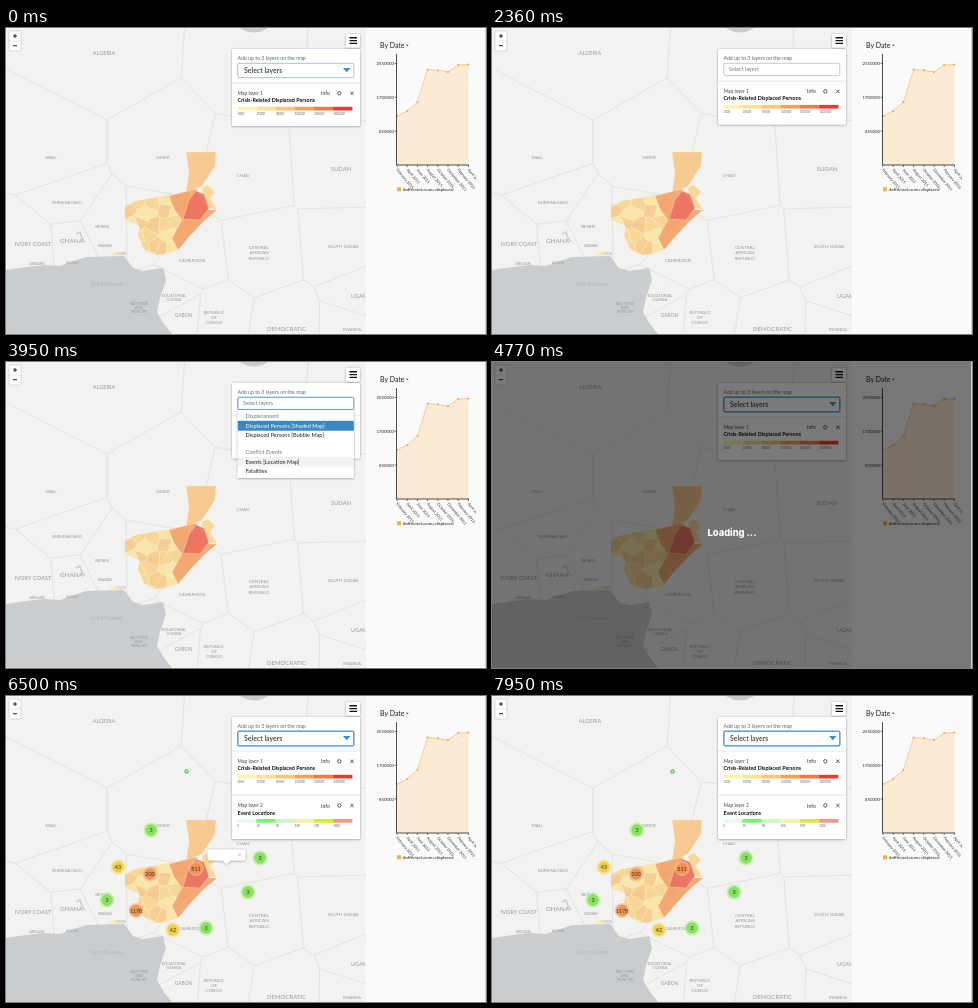
An HTML page that plays this animation: 480 px wide and 306 px high, repeating every 8 s.

```html
<!DOCTYPE html>
<html lang="en">
<head>
<meta charset="utf-8">
<title>Displacement map</title>
<style>
  html, body { margin: 0; width: 100%; height: 100%; overflow: hidden; background: #fafafb; }
  svg { display: block; width: 100vw; height: 100vh; font-family: Lato, "Open Sans", sans-serif; }
  .place { fill: #98999b; text-anchor: middle; }
  .borders { fill: none; stroke: #e2e2e4; stroke-width: .7; }
  .states { stroke: #fdf0cf; stroke-width: .35; fill-opacity: .88; }
</style>
</head>
<body>
<svg id="stage" viewBox="0 0 480 306" preserveAspectRatio="none"></svg>
<script>
const LOOP = 8000, OPEN = 2050, MENU = 2500, PICK = 4060, READY = 5140;

// Visible spans [from, to] in ms; a third value is a fade length.
const timeline = {
  closed: [[0, OPEN], [PICK, LOOP]],
  input: [[OPEN, PICK]],
  menu: [[MENU, PICK]],
  focus: [[MENU, PICK]],
  hover: [[3300, PICK]],
  ring: [[PICK, LOOP]],
  loading: [[PICK, READY]],
  panel1: [[0, OPEN], [PICK, READY]],
  panel2: [[READY, LOOP]],
  clusters: [[READY, LOOP]],
  popup: [[6330, 7400, 160]]
};

const text = (x, y, size, str, attrs = '') =>
  `<text x="${x}" y="${y}" font-size="${size}" ${attrs}>${str}</text>`;
const rect = (x, y, w, h, fill, attrs = '') =>
  `<rect x="${x}" y="${y}" width="${w}" height="${h}" fill="${fill}" ${attrs}/>`;
const path = (d, attrs = '') => `<path d="${d}" ${attrs}/>`;
const poly = (points, fill) => `<polygon points="${points}" fill="${fill}"/>`;
const group = (id, body) => `<g id="${id}">${body}</g>`;

let seed = 11;
const random = () => (seed = seed * 16807 % 2147483647) / 2147483647;

// Part of a polygon that lies nearer to point a than to point b.
function clipNearer(points, a, b) {
  const [dx, dy] = [b[0] - a[0], b[1] - a[1]];
  const side = p => (p[0] - (a[0] + b[0]) / 2) * dx + (p[1] - (a[1] + b[1]) / 2) * dy;
  return points.flatMap((p, i) => {
    const q = points[(i + 1) % points.length], sp = side(p), sq = side(q);
    const kept = sp <= 0 ? [p] : [];
    if (sp * sq < 0) kept.push(p.map((v, k) => v + (q[k] - v) * sp / (sp - sq)));
    return kept;
  });
}

function voronoi(sites) {
  const box = [[-1, -1], [361, -1], [361, 307], [-1, 307]];
  return sites.map(a => sites.filter(b => b !== a)
    .reduce((cell, b) => clipNearer(cell, a, b), box)
    .map(p => p.map(v => v.toFixed(1))).join(' '));
}

// Label, centre and type size; "|" breaks a line. Borders follow from the centres.
const countries = [
  ['ALGERIA', 98, 25, 5.5], ['', 255, 35], ['', 345, 40],
  ['MALI', 45, 129, 4.6], ['NIGER', 157, 129, 4.6], ['CHAD', 237, 147.5, 4.6],
  ['SUDAN', 335, 141, 5.9], ['BURKINA FASO', 61, 175, 4.2], ['BENIN', 96, 198.5, 4.5],
  ['GHANA', 65.5, 213.3, 6.4], ['IVORY COAST', 27, 216.5, 5.7], ['NIGERIA', 145, 198, 6],
  ['CAMEROON', 186, 233, 4.5], ['CENTRAL|AFRICAN|REPUBLIC', 253, 225, 4.5],
  ['SOUTH SUDAN', 337, 218.5, 4.3], ['EQUATORIAL|GUINEA', 168, 269.5, 4],
  ['GABON', 177.5, 287, 4.9], ['REPUBLIC|OF|CONGO', 208, 289.5, 4.5],
  ['DEMOCRATIC', 280.5, 301, 6], ['UGANDA', 357, 268, 5.5], ['RWANDA', 346, 302, 4]
];
const towns = [['IBADAN', 99, 218], ['ABIDJAN', 31, 236], ['ACCRA', 66, 234.5], ['LAGOS', 114, 226]];

function label([name, x, y, size]) {
  const lines = name.split('|');
  return lines.map((line, i) =>
    text(x, y + size * (.33 + 1.12 * (i - (lines.length - 1) / 2)), size, line, 'class="place"')).join('');
}

function drawStates() {
  const fills = ['#fbe3a0', '#fbe3a0', '#f9d38c', '#f8c987'];
  const sites = [];
  for (let x = 120; x < 195; x += 11)
    for (let y = 170; y < 230; y += 11) sites.push([x + random() * 9, y + random() * 9]);
  const cells = voronoi(sites).map(c => poly(c, fills[Math.floor(random() * fills.length)])).join('');
  return `<g class="states"><g clip-path="url(#stateClip)">${cells}</g>` +
    poly('180,124 210,124 209,138 196,158 180,165 183,145', '#f8c584') +
    poly('196,160 202,157 209,164 204,170 211,182 198,178', '#f9d38c') +
    poly('163,168 190,161 203,182 211,182 197,194 183,209 172,222 166,210 176,192 168,181', '#f3a16c') +
    poly('183,172 190,163 198,166 203,180 194,192 177,191', '#ec6e60') + '</g>';
}

function drawMap() {
  const cells = voronoi(countries.map(([, x, y]) => [x, y]));
  const water = 'M0,242L20,239 38,237 54,238 80,229 118,228 127,240 137,243 157,240' +
    'L160,252 154,270 151,284 158,296 166,306H0Z';
  return rect(0, 0, 360, 306, '#f2f2f1') + '<g clip-path="url(#mapClip)">' +
    `<g class="borders">${cells.map(c => poly(c, 'none')).join('')}</g>` +
    path(water + 'M234,0q14,9 28,0z', 'fill="#c9cdd0"') +
    path('M70,206l4,-2 2,6 3,4', 'fill="none" stroke="#c9cdd0" stroke-width="1.5"') +
    countries.filter(c => c[0]).map(label).join('') +
    towns.map(t => label([...t, 3.6])).join('') +
    text(100, 257.5, 5, 'Gulf of Guinea', 'text-anchor="middle" fill="#aeb3b7"') +
    label(['SÃO TOMÉ|AND|PRÍNCIPE', 133, 280, 3.7]) +
    poly('103,226 109,224 113,226 108,228', '#f8eba4') + drawStates() + '</g>';
}

function drawClusters() {
  const tone = n => n < 10 ? ['#b9ee98', '#7fe058'] : n < 100 ? ['#f5e08c', '#f1cb3c'] : ['#f6b88f', '#ee9049'];
  const marks = [
    [145, 134, 3], [112, 171, 43], [144, 178, 200], [190, 172.5, 811], [254, 162, 3],
    [242, 196, 3], [101, 204, 3], [130, 214.5, 1178], [167, 234, 42], [200, 232, 3]
  ];
  const disc = (x, y, r, fill, opacity) =>
    `<circle cx="${x}" cy="${y}" r="${r}" fill="${fill}" opacity="${opacity}"/>`;
  return marks.map(([x, y, n]) =>
    disc(x, y, 7.5, tone(n)[0], .75) + disc(x, y, 5.7, tone(n)[1], .9) +
    text(x, y + 2, 5.4, n, 'text-anchor="middle" fill="#333"')).join('') +
    '<circle cx="180.5" cy="75.5" r="1.7" fill="#c9f0c0" stroke="#38a838"/>';
}

const panelBox = bottom =>
  rect(226, 21, 128, bottom - 21, '#fff', 'rx="1.5" filter="url(#shadow)"');

// One legend section, hung below its divider.
function drawLayer(top, index, title, colors, stops) {
  const y = top + 10.3, step = 115 / 6;
  return path(`M226,${top}h128`, 'stroke="#e0e0e0" stroke-width=".8"') +
    text(231.5, y + 1.8, 4.9, `Map layer ${index}`, 'fill="#444"') +
    text(231.5, y + 9, 5.35, title, 'font-weight="700" fill="#111"') +
    text(315, y + 2, 5.1, 'Info', 'fill="#333"') +
    `<circle cx="333.3" cy="${y}" r="1.7" fill="none" stroke="#555"/>` +
    path(`M344.2,${y - 1.7}l3.4,3.4m0,-3.4l-3.4,3.4`, 'stroke="#444" stroke-width=".9"') +
    colors.map((c, i) => rect(231.3 + i * step, y + 13.5, step + .1, 3.7, c)).join('') +
    stops.map((s, i) => text(231.3 + i * step, y + 21.2, 3, s, 'fill="#666"')).join('');
}

const displaced = top => drawLayer(top, 1, 'Crisis-Related Displaced Persons',
  ['#fdf3ae', '#fbe19a', '#f9c67a', '#f5a257', '#ee7b4b', '#e63c34'],
  [1000, 10000, 50000, 100000, 500000, 1000000]);
const events = top => drawLayer(top, 2, 'Event Locations',
  ['#e3fbf4', '#72f572', '#cdf6cb', '#f4f3a6', '#d9ea35', '#f59888'],
  [0, 10, 50, 100, 500, 1000]);

function drawControls() {
  const field = (h, fill, stroke, width) =>
    rect(231.8, 35.3, 116, h, fill, `rx="1.2" stroke="${stroke}" stroke-width="${width}"`);
  const zoom = rect(3, 3, 12, 20, '#fff', 'rx="1.5" stroke="#c4c4c4" stroke-width=".6"') +
    path('M3,13h12', 'stroke="#ccc" stroke-width=".5"') +
    path('M7,8h4m-2,-2v4M7,17.7h4', 'stroke="#222"');
  const burger = rect(340, 6, 14, 13.5, '#fff', 'rx="1.5" filter="url(#shadow)"') +
    path('M343.5,9.8h7.5m-7.5,2.8h7.5m-7.5,2.8h7.5', 'stroke="#111" stroke-width="1.4"');
  const closed = displaced(55) + field(14.4, '#fff', '#9fbccf', .9) +
    text(238, 45.2, 6.9, 'Select layers', 'font-weight="700" fill="#555"') +
    path('M337,40h7.5l-3.75,4.2z', 'fill="#3d8ec4"');
  const input = panelBox(96.5) + displaced(53.1) + field(12.4, '#fff', '#bbb', .8) +
    text(237, 43.4, 5.5, 'Select layers', 'fill="#777"');
  return zoom + burger +
    group('panel1', panelBox(98)) + group('panel2', panelBox(143) + events(99.2)) +
    group('closed', closed) + group('ring', field(14.4, 'none', '#60a5d6', 1.5)) +
    group('input', input) + group('focus', field(12.4, 'none', '#66a9d8', 1)) +
    text(231.5, 31.7, 5.2, 'Add up to 3 layers on the map', 'fill="#666"');
}

function drawMenu() {
  const heading = (y, str) => text(239.5, y, 5.55, str, 'fill="#777"');
  const item = (y, str, fill = '#222') => text(239.5, y, 5.55, str, `fill="${fill}"`);
  return rect(231.8, 48, 116, 68, '#fff', 'filter="url(#shadow)"') +
    rect(231.8, 58.8, 116, 9.9, '#3b87c2') +
    group('hover', rect(231.8, 95, 116, 9.5, '#f2f2f2')) +
    heading(56, 'Displacement') +
    item(66, 'Displaced Persons [Shaded Map]', '#fff') +
    item(75.4, 'Displaced Persons [Bubble Map]') +
    heading(92, 'Conflict Events') +
    item(101.8, 'Events [Location Map]') +
    item(111.3, 'Fatalities');
}

function drawChart() {
  const heights = [88, 83, 74, 41.5, 42.3, 44, 37, 36.5];
  const names = ['February', 'April', 'June', 'August', 'October', 'December'];
  const xAt = i => 391 + i * 10.2;
  const line = 'M' + heights.map((y, i) => `${xAt(i)},${y}`).join('L');
  const tick = k => path(`M388.7,${136.8 - k * 33.8}h2`, 'stroke="#222" stroke-width=".7"') +
    text(388, 138.3 - k * 33.8, 4.3, k * 850000, 'text-anchor="end" fill="#222"');
  const month = i => path(`M${xAt(i)},137v2`, 'stroke="#222" stroke-width=".6"') +
    text(0, 0, 3.9, `${names[i % 6]} ${2015 + Math.floor(i / 6)}`,
      `transform="translate(${xAt(i) - 1},142) rotate(50)" fill="#333"`);
  return rect(360, 0, 120, 306, '#fafafb') +
    text(374, 19.5, 7, 'By Date', 'fill="#222"') +
    path('M400,16.7h2.6l-1.3,1.5z', 'fill="#333"') +
    path(line + 'V137H391Z', 'fill="#fcebd4"') +
    path(line, 'fill="none" stroke="#efbd7c" stroke-width=".7"') +
    heights.map((y, i) => `<circle cx="${xAt(i)}" cy="${y}" r="1" fill="#eda951"/>`).join('') +
    path('M390.5,26V137H463', 'fill="none" stroke="#222" stroke-width=".8"') +
    [1, 2, 3].map(tick).join('') +
    `<g clip-path="url(#chartClip)">${heights.map((_, i) => month(i)).join('')}</g>` +
    rect(391, 159.3, 4, 4, '#f0b23f') +
    text(397, 163, 4.5, '#affected+sum+displaced', 'fill="#222"');
}

const popup = path('M204,153.5h33q2.5,0 2.5,2.5v6q0,2.5 -2.5,2.5h-13l-3.5,3.8l-3.5,-3.8h-13' +
  'q-2.5,0 -2.5,-2.5v-6q0,-2.5 2.5,-2.5z', 'fill="#fff" filter="url(#shadow)"') +
  path('M232,157.4l2.8,2.8m0,-2.8l-2.8,2.8', 'stroke="#bbb" stroke-width=".8"');

const loading = rect(0, 0, 480, 306, '#000', 'opacity=".52"') +
  text(240, 174.3, 9.3, 'Loading ...',
    'font-family="Inter, sans-serif" font-weight="800" fill="#fff" text-anchor="middle"');

document.getElementById('stage').innerHTML = `<defs>
  <clipPath id="mapClip"><rect width="360" height="306"/></clipPath>
  <clipPath id="chartClip"><rect x="360" y="130" width="110" height="40"/></clipPath>
  <clipPath id="stateClip"><polygon points="119,178 130,173 147,170 180,164 196,190 172,222 160,226 148,227 138,221 132,207 134,198 119,192"/></clipPath>
  <filter id="shadow" x="-20%" y="-20%" width="140%" height="150%">
    <feDropShadow dx="0" dy=".5" stdDeviation=".9" flood-color="#000" flood-opacity=".4"/>
  </filter></defs>` +
  drawMap() + group('clusters', drawClusters()) + group('popup', popup) +
  drawChart() + drawControls() + group('menu', drawMenu()) + group('loading', loading) +
  rect(479, 0, 1, 306, '#c4d6da');

const parts = Object.entries(timeline).map(([id, spans]) => [document.getElementById(id), spans]);

function opacityAt(spans, t) {
  const span = spans.find(([from, to]) => t >= from && t < to);
  if (!span) return 0;
  const [from, to, fade] = span;
  return fade ? Math.min(1, (t - from) / fade, (to - t) / fade) : 1;
}

const start = performance.now();
function frame() {
  const t = (performance.now() - start) % LOOP;
  for (const [el, spans] of parts) el.style.opacity = opacityAt(spans, t);
  requestAnimationFrame(frame);
}
frame();
</script>
</body>
</html>
```
